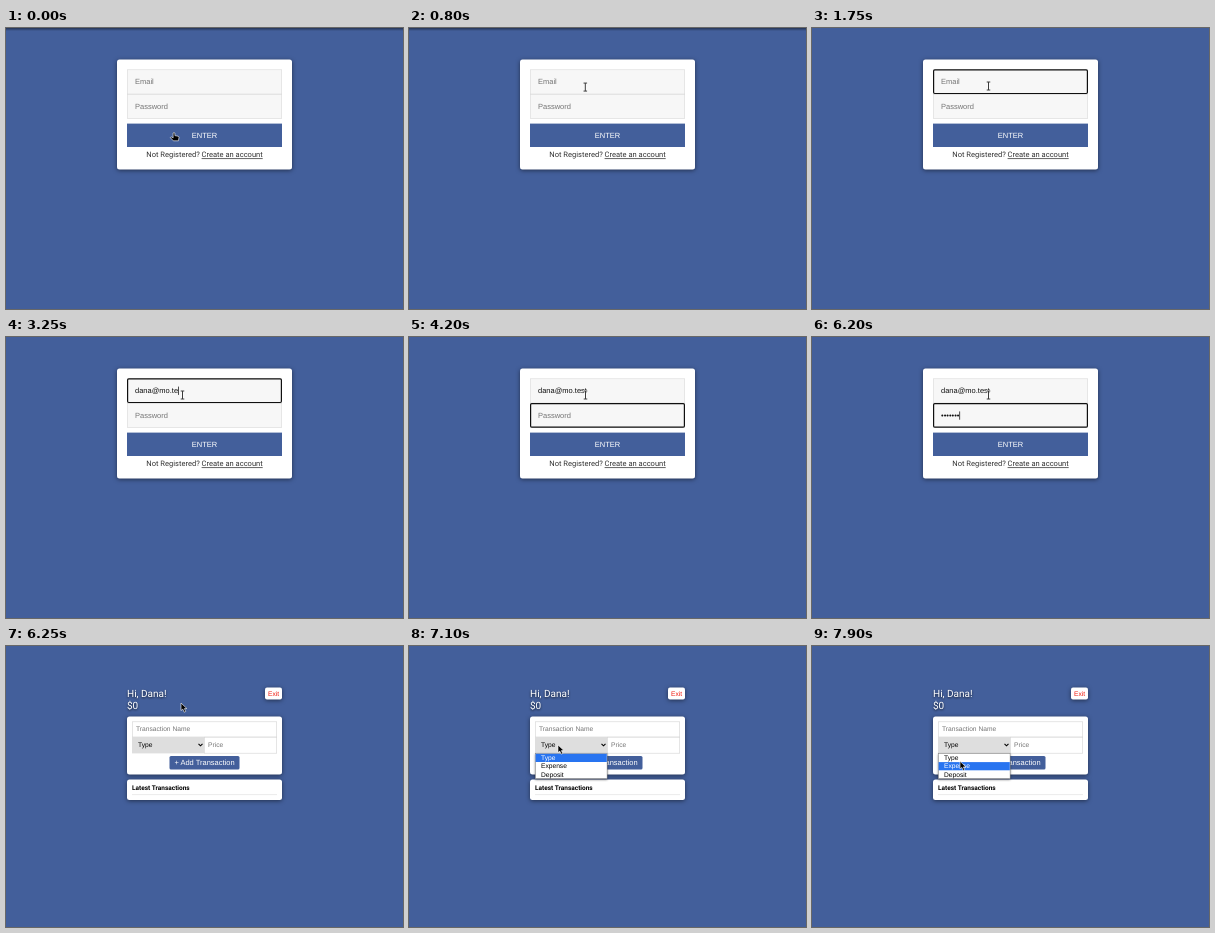
Write an HTML page that moves like this. It is 397 px wide and 281 px high and loops after 8000 ms.

```html
<!DOCTYPE html>
<html lang="en">
<head>
<meta charset="utf-8">
<title>Sign in and add a transaction</title>
<style>
html, body { margin: 0; width: 100%; height: 100%; overflow: hidden; background: #435f9b; }
svg { display: block; width: 397px; height: 281px; }
text { font-family: "Liberation Sans", Arial, sans-serif; font-size: 7.5px; text-rendering: geometricPrecision; white-space: pre; }
.roboto { font-family: Roboto, sans-serif; }
.small { font-size: 6.67px; }
.mid { text-anchor: middle; }
.hint { fill: #757575; }
.white { fill: #fff; }
.blue { fill: #435f9b; }
.card { fill: #fff; filter: drop-shadow(0 1.8px 1.9px rgba(0, 0, 0, .5)); }
.head { font-size: 10px; fill: #fff; filter: drop-shadow(0 1.2px 1.2px rgba(0, 0, 0, .7)); }
.field { fill: #f7f7f7; stroke: #d9d9d9; stroke-width: .6; }
.box { fill: #fff; stroke: #d4d4d4; stroke-width: .6; }
.ring { fill: none; stroke: #101010; stroke-width: 1.2; }
.pointer { fill: #000; stroke: #fff; stroke-width: .6; stroke-linejoin: round; }
.menu { fill: #fff; stroke: #777; stroke-width: .5; filter: drop-shadow(0 1px 1.3px rgba(0, 0, 0, .45)); }
</style>
</head>
<body>
<svg viewBox="0 0 397 281">
  <defs>
    <linearGradient id="fade" x2="0" y2="1">
      <stop stop-opacity=".45"/>
      <stop offset="1" stop-opacity="0"/>
    </linearGradient>
  </defs>
  <rect class="blue" width="397" height="281"/>
  <rect id="shade" width="397" height="3" fill="url(#fade)"/>

  <g id="login">
    <rect class="card" x="111" y="31.5" width="175" height="110" rx="2.5"/>
    <rect class="field" x="121.3" y="41.8" width="154.4" height="24.2"/>
    <rect class="field" x="121.3" y="66.3" width="154.4" height="24.2"/>
    <rect class="ring" id="ring" x="121.6" width="153.8" height="23.6" rx="1.2"/>
    <text id="email" x="129" y="56.3"></text>
    <text id="password" x="129" y="80.9"></text>
    <rect id="caret" width=".7" height="8.3"/>
    <rect class="blue" x="121" y="95.6" width="155" height="23.4"/>
    <text class="white mid" x="198.5" y="109.9">ENTER</text>
    <text class="roboto mid" x="198.5" y="129.3" fill="#333" style="font-size:7.55px">Not Registered? <tspan text-decoration="underline">Create an account</tspan></text>
  </g>

  <g id="home">
    <text class="roboto head" x="121" y="51.1">Hi, Dana!</text>
    <text class="roboto head" x="121" y="62.9">$0</text>
    <rect class="card" x="259" y="41.5" width="17" height="12" rx="2"/>
    <text class="small mid" x="267.5" y="49.9" fill="#f01c10">Exit</text>
    <rect class="card" x="121" y="70.5" width="155" height="58" rx="2.5"/>
    <rect class="box" x="126.3" y="75.8" width="144.4" height="15.2"/>
    <text class="small hint" x="130" y="85.4">Transaction Name</text>
    <rect x="126" y="91" width="72.5" height="16.4" fill="#dedede"/>
    <text class="small" x="132" y="101.3">Type</text>
    <path d="M192.5 97.8l2 2 2-2" fill="none" stroke="#000" stroke-width="1.1"/>
    <rect class="box" x="198.5" y="91.2" width="72.2" height="16"/>
    <text class="small hint" x="202" y="101.3">Price</text>
    <rect class="blue" x="163.5" y="110" width="70" height="13.6" rx="1.5"/>
    <text class="white mid" x="198.5" y="119.4">+ Add Transaction</text>
    <rect class="card" x="121" y="133.5" width="155" height="20.5" rx="2.5"/>
    <text class="roboto" x="126" y="144.2" style="font-size:6.5px;font-weight:700">Latest Transactions</text>
    <path d="M126 148.6h145" stroke="#ddd" stroke-width=".6"/>
  </g>

  <g id="menu">
    <rect class="menu" x="126.3" y="107.6" width="71.8" height="25.1"/>
    <rect id="pick" x="126.6" width="71.2" height="8.2" fill="#2874f0"/>
    <text class="small option" x="132" y="114.1">Type</text>
    <text class="small option" x="132" y="122.3">Expense</text>
    <text class="small option" x="132" y="130.5">Deposit</text>
  </g>

  <path class="pointer" id="hand" d="M-.9 0Q0-1 .9 0V2.6L4 3.2Q5 3.5 5 4.5L4.4 7.8H-.6L-3.7 4.6Q-3 3.4-1.8 4.3L-.9 5Z"/>
  <g id="beam" fill="none">
    <path d="M-2-4H2M0-4V4M-2 4H2" stroke="#fff" stroke-width="1.9"/>
    <path d="M-1.8-4H1.8M0-4V4M-1.8 4H1.8" stroke="#3a3a3a" stroke-width="1"/>
  </g>
  <path class="pointer" id="arrow" d="M0 0V7.6L1.8 6.1 3.2 9.2 4.7 8.5 3.4 5.6H5.9Z"/>
</svg>
<script>
const LOOP = 8000, TICK = 50, BLINK = 600;
const ENTERED = 6250, OPENED = 7100;
const $ = id => document.getElementById(id);
const options = document.querySelectorAll('.option');
const fields = [
  { el: $('email'), hint: 'Email', value: 'dana@mo.test', focus: 1150, ringY: 41.9, caretY: 49.6,
    keys: [1850, 1950, 2100, 2250, 2500, 2850, 2950, 3050, 3150, 3250, 3350, 3500] },
  { el: $('password'), hint: 'Password', value: '•••••••', focus: 3600, ringY: 66.6, caretY: 74.4,
    keys: [4300, 4350, 4500, 4700, 4800, 4950, 5000] }
];
const moves = [
  { start: 400, end: 850, from: [168, 105], to: [176.5, 58] },
  { start: 6550, end: 7050, from: [175, 57], to: [149, 99] },
  { start: 7350, end: 7900, from: [149, 99], to: [148, 115.3] }
];

const clamp = v => Math.min(1, Math.max(0, v));
// Quick start, slower approach to the goal.
const ease = v => { const u = v ** .8; return u * u * (3 - 2 * u); };
const show = (id, on) => $(id).style.display = on ? '' : 'none';
const set = (el, attrs) => { for (const k in attrs) el.setAttribute(k, attrs[k]); };

function pointerAt(t) {
  const m = t >= ENTERED ? moves.findLast(m => t >= m.start) === moves[2] ? moves[2] : moves[1] : moves[0];
  const k = ease(clamp((t - m.start) / (m.end - m.start)));
  return m.from.map((v, i) => v + (m.to[i] - v) * k);
}

function drawFields(t) {
  const active = fields.findLast(f => t >= f.focus);
  for (const f of fields) {
    const count = f.keys.filter(k => t >= k).length;
    f.el.textContent = count ? f.value.slice(0, count) : f.hint;
    f.el.setAttribute('fill', count ? '#111' : '#757575');
    if (f !== active) continue;
    const since = t - (count ? f.keys[count - 1] : f.focus);
    const x = 129 + (count ? f.el.getComputedTextLength() : -.4);
    set($('ring'), { y: f.ringY });
    set($('caret'), { x, y: f.caretY });
    show('caret', since % (2 * BLINK) < BLINK);
  }
  show('ring', active);
  if (!active) show('caret', false);
}

function drawPointer(x, y, home) {
  const kind = home ? 'arrow' : y > 95.6 ? 'hand' : y > 91 ? 'arrow' : 'beam';
  for (const id of ['hand', 'beam', 'arrow']) show(id, id === kind);
  set($(kind), { transform: `translate(${x} ${y})` });
}

function draw(t) {
  const home = t >= ENTERED;
  const [x, y] = pointerAt(t);
  show('login', !home);
  show('home', home);
  show('menu', t >= OPENED);
  $('shade').style.opacity = 1 - clamp((t - 1150) / 150);
  if (!home) drawFields(t);
  const picked = y > 114.5 ? 1 : 0;
  set($('pick'), { y: 107.8 + picked * 8.3 });
  options.forEach((o, i) => set(o, { fill: i === picked ? '#fff' : '#000' }));
  drawPointer(x, y, home);
}

const begin = performance.now();
function frame() {
  const t = (performance.now() - begin) % LOOP;
  draw(Math.floor(t / TICK) * TICK);
  requestAnimationFrame(frame);
}
frame();
</script>
</body>
</html>
```
